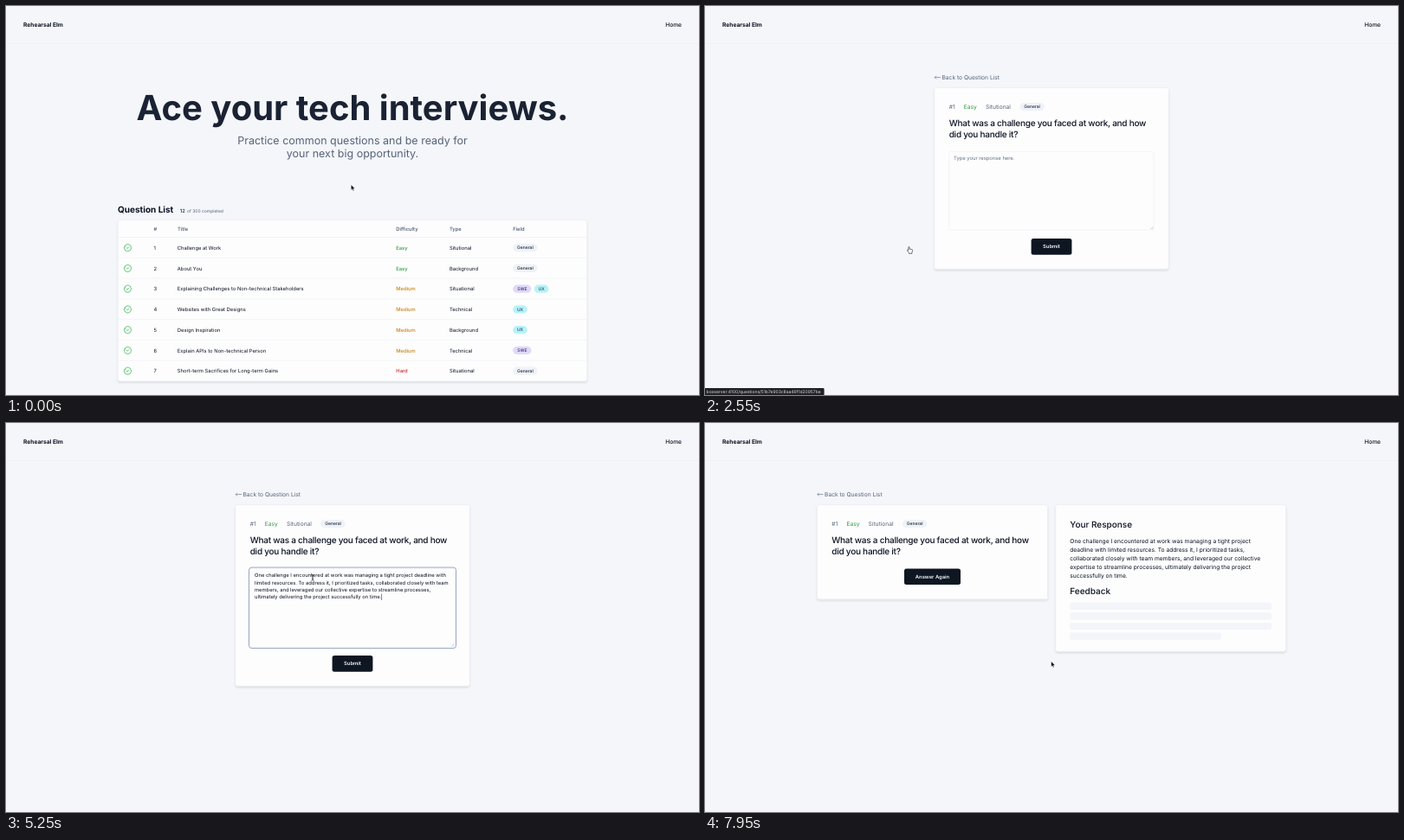
Write an HTML page that moves like this. It is 800x450 px and loops after 8000 ms.

```html
<!DOCTYPE html>
<html lang="en">
<head>
<meta charset="utf-8">
<title>Interview practice</title>
<style>
html, body { margin: 0; width: 100%; height: 100%; overflow: hidden; background: #f4f6fa; }
svg { display: block; width: 100%; height: 100%; }
text {
  font-family: Inter, "Liberation Sans", sans-serif;
  font-optical-sizing: none;
  text-rendering: geometricPrecision;
  white-space: pre;
}
</style>
</head>
<body>
<svg id="stage" viewBox="0 0 800 450" xmlns="http://www.w3.org/2000/svg"></svg>
<script>
const LOOP = 8000, STEP = 50;
const UNIT = 5 / 12;            // one page pixel on the stage
const INK = '#0b1120', SLATE = '#566378', LINE = '#e3e8ef', CARD = '#fdfdfe', DARK = '#0e1622';
const LEVEL = { Easy: '#2f9e44', Medium: '#c9820f', Hard: '#c92a2a' };
const PILL = {
  General: ['#eff2f7', '#1b2434', 28.3],
  SWE: ['#e0d9f8', '#3d2f78', 21.2],
  UX: ['#b8f2f9', '#14505c', 16.6]
};
const ROW_TOP = 267.8, ROW_H = 23.75, LEFT = 129.2, RIGHT = 670.8;
const ROWS = [
  ['Challenge at Work', 'Easy', 'Situtional', 'General'],
  ['About You', 'Easy', 'Background', 'General'],
  ['Explaining Challenges to Non-technical Stakeholders', 'Medium', 'Situational', 'SWE UX'],
  ['Websites with Great Designs', 'Medium', 'Technical', 'UX'],
  ['Design Inspiration', 'Medium', 'Background', 'UX'],
  ['Explain APIs to Non-technical Person', 'Medium', 'Technical', 'SWE'],
  ['Short-term Sacrifices for Long-term Gains', 'Hard', 'Situational', 'General']
];
const ANSWER = [
  'One challenge I encountered at work was managing a tight project deadline with',
  'limited resources. To address it, I prioritized tasks, collaborated closely with team',
  'members, and leveraged our collective expertise to streamline processes,',
  'ultimately delivering the project successfully on time.'
];
const RESPONSE = [
  'One challenge I encountered at work was managing a tight project',
  'deadline with limited resources. To address it, I prioritized tasks,',
  'collaborated closely with team members, and leveraged our collective',
  'expertise to streamline processes, ultimately delivering the project',
  'successfully on time.'
];

// Text whose line box is centred on cy; size is in page pixels.
function text(x, cy, size, str, fill = INK, weight = 400, extra = '') {
  const fs = size * UNIT;
  return `<text x="${x}" y="${cy + fs * 0.364}" font-size="${fs}" fill="${fill}" font-weight="${weight}" ${extra}>${str}</text>`;
}
function box(x, y, x2, y2, fill, r = 0, extra = '') {
  return `<rect x="${x}" y="${y}" width="${x2 - x}" height="${y2 - y}" rx="${r}" fill="${fill}" ${extra}/>`;
}
function rule(y, x, x2) {
  return `<path d="M${x} ${y}H${x2}" stroke="${LINE}" stroke-width=".42"/>`;
}
function card(x, y, x2, y2) {
  return box(x, y, x2, y2, CARD, 2.6, `stroke="${LINE}" stroke-width=".42" filter="url(#shadow)"`);
}
function pill(x, cy, name) {
  const [bg, fg, w] = PILL[name];
  return box(x, cy - 4.6, x + w, cy + 4.6, bg, 4.6) +
    text(x + w / 2, cy, 12, name, fg, 500, 'text-anchor="middle"');
}
function button(cx, half, label, id = '') {
  return box(cx - half, 168.4, cx + half, 187, DARK, 2.5, id && `id="${id}"`) +
    text(cx, 177.6, 14, label, '#f8fafc', 600, 'text-anchor="middle"');
}
function lines(list, x, cy, size, gap) {
  return list.map((s, i) => text(x, cy + i * gap, size, s)).join('');
}

function header() {
  return text(20, 21.7, 16, 'Rehearsal Elm', INK, 700) +
    text(780, 21.7, 16, 'Home', INK, 500, 'text-anchor="end"') + rule(43.4, 0, 800);
}

function listPage() {
  const mid = 'text-anchor="middle"';
  let s = text(400, 117.5, 96, 'Ace your tech interviews.', '#1a2233', 700, mid) +
    text(400, 155, 30, 'Practice common questions and be ready for', SLATE, 400, mid) +
    text(400, 170, 30, 'your next big opportunity.', SLATE, 400, mid) +
    text(129, 235.4, 24, 'Question List', INK, 700) +
    text(200.8, 236.5, 14, '12', '#3a4659', 600) +
    text(208.9, 236.7, 12, 'of 300 completed', SLATE) +
    card(LEFT, 247.6, RIGHT, 433.9) +
    `<rect id="hover" x="${LEFT + .2}" width="${RIGHT - LEFT - .4}" height="${ROW_H}" fill="#f4f6f9"/>`;
  [[170.6, '#'], [198, 'Title'], [450.3, 'Difficulty'], [511.9, 'Type'], [585.2, 'Field']]
    .forEach(([x, label]) => s += text(x, 257.6, 14, label, '#46546a', 500));
  ROWS.forEach(([title, level, type, fields], i) => {
    const top = ROW_TOP + i * ROW_H, cy = top + ROW_H / 2;
    let x = 585.2;
    s += rule(top - .2, LEFT, RIGHT) +
      `<use href="#done" transform="translate(135.5 ${cy - 5}) scale(${UNIT})"/>` +
      text(170.6, cy, 14, i + 1) + text(197.8, cy, 14, title) +
      text(450.3, cy, 14, level, LEVEL[level], 500) + text(511.9, cy, 14, type);
    for (const f of fields.split(' ')) {
      s += pill(x, cy, f);
      x += PILL[f][2] + 3.4;
    }
  });
  return s;
}

// Back link and question text, laid out from the left edge of the card.
function backLink() {
  return '<path d="M7.1 82.6H.4M2.2 80.8L.4 82.6L2.2 84.4" fill="none" stroke="#566378" stroke-width=".6"/>' +
    text(8.7, 82.3, 16, 'Back to Question List', SLATE);
}
function question() {
  const tight = 'letter-spacing="-.25"';
  return text(16.9, 116.1, 16, '#1', SLATE) + text(34, 116.1, 16, 'Easy', LEVEL.Easy) +
    text(59.1, 116.1, 16, 'Situtional', SLATE) + pill(98.6, 116.6, 'General') +
    text(16.9, 135, 24, 'What was a challenge you faced at work, and how', INK, 500, tight) +
    text(16.9, 148.3, 24, 'did you handle it?', INK, 500, tight);
}

function askPage() {
  return card(264.8, 94.6, 535.2, 304.2) +
    `<g transform="translate(264.8 0)">${backLink()}${question()}</g>` +
    box(280.45, 167.05, 519.55, 260.65, CARD, 3.4, 'id="ring" stroke="#8598b1" stroke-width=".85"') +
    box(281.7, 168.4, 518.3, 259.3, CARD, 2.5, `stroke="${LINE}" stroke-width=".42"`) +
    '<path d="M514.4 258.2L517.3 255.3M516.2 258.2L517.3 257.1" stroke="#7d8288" stroke-width=".4"/>' +
    `<g id="hint">${text(287, 176.3, 14, 'Type your response here.', '#647084')}</g>` +
    `<g id="answer">${lines(ANSWER, 287, 176.3, 14, 8.33)}</g>` +
    '<rect id="caret" width=".5" height="7.4" fill="#0b1120"/>' +
    `<g transform="translate(0 100.7)">${button(400, 23.4, 'Submit', 'submit')}</g>`;
}

function resultPage() {
  let s = card(129.4, 94.6, 395.5, 203.8) + card(404.7, 94.6, 670.6, 264.2) +
    `<g transform="translate(129.4 0)">${backLink()}${question()}</g>` +
    button(262.5, 32.5, 'Answer Again') +
    text(421.3, 117.5, 24, 'Your Response', INK, 500) +
    lines(RESPONSE, 421.3, 136.1, 16, 10) +
    text(421.3, 194.2, 24, 'Feedback', INK, 500);
  for (let i = 0; i < 4; i++) {
    const y = 207.6 + i * 11.65;
    s += box(421.3, y, i < 3 ? 654 : 595.8, y + 8.3, '#f3f5f9', 2.2);
  }
  return s;
}

const DEFS = `<defs>
  <filter id="shadow" x="-10%" y="-10%" width="120%" height="125%">
    <feDropShadow dx="0" dy="1.5" stdDeviation="1.2" flood-color="#000" flood-opacity=".13"/>
  </filter>
  <g id="done" fill="none" stroke="#35b653" stroke-width="2" stroke-linecap="round" stroke-linejoin="round">
    <path d="M3.85 8.62a4 4 0 0 1 4.78-4.77 4 4 0 0 1 6.74 0 4 4 0 0 1 4.78 4.78 4 4 0 0 1 0 6.74 4 4 0 0 1-4.77 4.78 4 4 0 0 1-6.75 0 4 4 0 0 1-4.78-4.77 4 4 0 0 1 0-6.76Z"/>
    <path d="M9 12l2 2 4-4"/>
  </g>
</defs>`;

const CURSORS = `
  <path id="arrow" d="M0 0V6.3L1.45 4.95L2.4 7.2L3.5 6.75L2.55 4.55H4.55Z" fill="#000" stroke="#fff" stroke-width=".5" stroke-linejoin="round"/>
  <path id="hand" d="M-.6 .5Q-.6 -.1 0 -.1Q.6 -.1 .65 .5L.9 2.5Q1.6 2 2.1 2.7Q2.8 2.3 3.2 3Q4.1 2.8 4.1 3.7Q4.2 5.2 3.5 6.2V7.6H.1V6.9L-1.9 4.3Q-2.2 3.6 -1.6 3.4Q-1 3.3 -.4 4Z" fill="#fff" stroke="#000" stroke-width=".55" stroke-linejoin="round"/>
  <path id="beam" d="M-1.3 -3.2Q0 -3.2 0 -2.4Q0 -3.2 1.3 -3.2M0 -2.5V2.5M-1.3 3.2Q0 3.2 0 2.4Q0 3.2 1.3 3.2M-.7 1H.7" fill="none" stroke="#000" stroke-width=".65"/>`;

const stage = document.getElementById('stage');
stage.innerHTML = DEFS + header() +
  `<g id="list">${listPage()}</g><g id="ask">${askPage()}</g><g id="result">${resultPage()}</g>` +
  `<g id="status"><path d="M0 442H136.2Q137.6 442 137.6 443.4V450H0Z" fill="#202124"/>` +
  text(1.6, 446, 12, 'boxserver:4100/questions/51b7e903c8aa46f1d20957be', '#dcdde0') + '</g>' +
  `<g id="pointer">${CURSORS}</g>`;

const el = {};
stage.querySelectorAll('[id]').forEach(n => el[n.id] = n);
const show = (id, on) => el[id].setAttribute('visibility', on ? 'inherit' : 'hidden');
const clamp = v => Math.max(0, Math.min(1, v));

// time, x, y of the pointer's hot spot
const PATH = [
  [0, 398.3, 206.8], [50, 398.3, 206.8], [850, 252, 418], [1300, 238, 276.6], [1700, 235.4, 278.7],
  [2800, 235.4, 278.7], [2950, 287.4, 256], [3150, 360, 222], [3400, 360, 222], [3650, 354, 178.8],
  [6200, 354, 178.8], [6250, 358, 185], [6450, 360.3, 236.5], [6700, 360.3, 236.5], [7050, 399.6, 275.8],
  [LOOP, 399.6, 275.8]
];
function pointerAt(t) {
  const i = PATH.findIndex(p => p[0] > t);
  const [t0, x0, y0] = PATH[i - 1], [t1, x1, y1] = PATH[i];
  const k = (t - t0) / (t1 - t0);
  return [x0 + (x1 - x0) * k, y0 + (y1 - y0) * k];
}
function shapeAt(t, y, row) {
  if (t < 2550) return row >= 0 ? 'hand' : 'arrow';
  if (t < 2850) return 'hand';
  if (t < 3000 || t >= 7950) return 'arrow';
  if (y < 259.3) return 'beam';
  return y < 269 ? 'arrow' : 'hand';
}

function draw(t) {
  const [x, y] = pointerAt(t);
  const page = t < 2550 ? 'list' : t < 7250 ? 'ask' : 'result';
  ['list', 'ask', 'result'].forEach(p => show(p, p === page));

  const row = y < ROW_TOP ? -1 : Math.floor((y - ROW_TOP) / ROW_H);
  show('hover', row >= 0);
  el.hover.setAttribute('y', ROW_TOP + Math.max(row, 0) * ROW_H);

  const pasted = t >= 5250, focused = t >= 3850;
  show('ring', focused);
  show('hint', !pasted);
  show('answer', pasted);
  const since = t - (pasted ? 5250 : 3850);
  show('caret', focused && since % 1000 < 500);
  const last = el.answer.lastElementChild;
  el.caret.setAttribute('x', pasted ? 287.2 + last.getComputedTextLength() : 286.9);
  el.caret.setAttribute('y', pasted ? 197.6 : 172.6);
  el.submit.setAttribute('fill', page === 'ask' && y > 269.2 && t > 6700 ? '#272f3f' : DARK);

  el.status.setAttribute('opacity', Math.min(clamp((t - 1650) / 400), clamp((3100 - t) / 300)));

  const shape = shapeAt(t, y, row);
  ['arrow', 'hand', 'beam'].forEach(c => show(c, c === shape));
  el.pointer.setAttribute('transform', `translate(${x} ${y})`);
}

const start = performance.now();
function tick() {
  const t = (performance.now() - start) % LOOP;
  draw(Math.floor(t / STEP) * STEP);
  requestAnimationFrame(tick);
}
tick();
</script>
</body>
</html>
```
